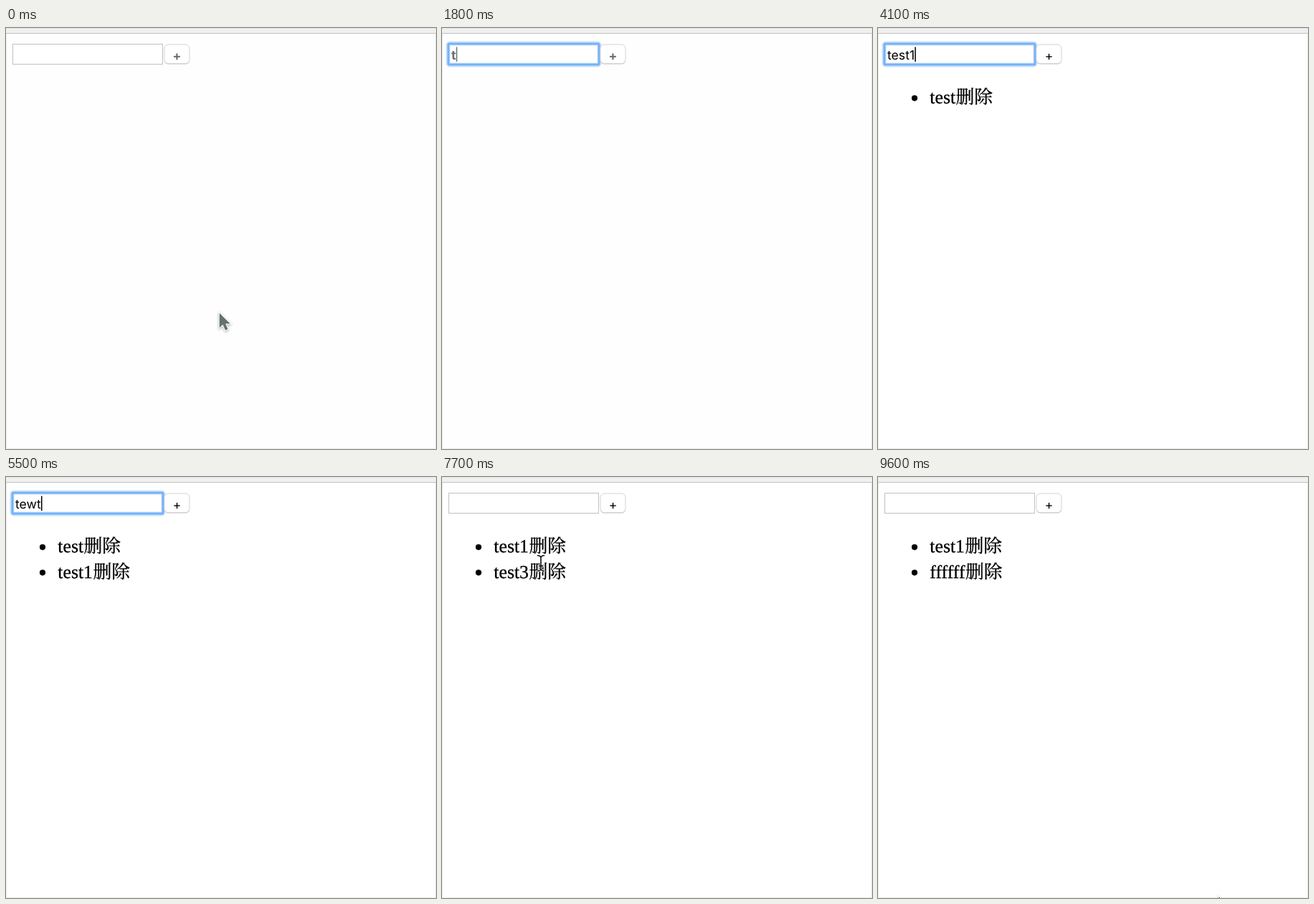
An HTML page that plays this animation: 600x587 px, repeating every 9700 ms.

```html
<!DOCTYPE html>
<html lang="zh">
<head>
<meta charset="utf-8">
<title>List demo</title>
<style>
  html, body { margin: 0; width: 100%; height: 100%; overflow: hidden; background: #fff; }
  svg { display: block; width: 600px; height: 587px; --ink: #000; }
  svg.faded { --ink: #667170; }
  text { fill: var(--ink); white-space: pre; text-rendering: geometricPrecision; }
  .ui { font: 17.6px Inter, "Liberation Sans", sans-serif; }
  .faded .ui { font-weight: 700; }
  .item {
    font: 25.8px "Liberation Serif", "Noto Serif CJK SC", "Noto Sans CJK SC", serif;
    font-variant-ligatures: none;
    stroke: var(--ink);
    stroke-width: .3px;
  }
  .cjk { font-family: "Noto Serif CJK SC", "Noto Sans CJK SC", "Noto Sans CJK", serif; font-weight: 500; }
  #arrow { filter: drop-shadow(0 1.5px 1.5px rgba(0, 0, 0, .35)); }
</style>
</head>
<body>
<svg id="stage" viewBox="0 0 600 587">
  <rect id="page" width="600" height="587" fill="#fff"/>
  <path d="M.5 8V586.5H599.5V8" fill="none" stroke="#ececec"/>
  <rect width="600" height="7" fill="#f0f0f0"/>
  <path d="M0 .5H600" stroke="#e3e3e3"/>
  <path d="M0 7.5H600" stroke="#c2c2c2"/>

  <rect x="9.5" y="22.5" width="209" height="28" fill="#fff" stroke="#c0c0c0"/>
  <g id="glow" fill="none">
    <rect x="8.5" y="21.5" width="211" height="30" rx="2.5" stroke="#a9d0fb" stroke-opacity=".6" stroke-width="6"/>
    <rect x="8.9" y="21.9" width="210.2" height="29.2" rx="1.5" stroke="#75b1f7" stroke-width="3"/>
  </g>
  <text id="typed" class="ui" x="13" y="43.5"></text>
  <rect id="caret" y="26.5" width="1.5" height="20.5" fill="var(--ink)"/>

  <rect x="221" y="24" width="35" height="26.6" rx="5.5" fill="#c4c4c4"/>
  <rect x="221" y="23" width="35" height="26.6" rx="5.5" fill="#fff" stroke="#d2d2d2"/>
  <text class="ui" x="238.5" y="44.8" text-anchor="middle">+</text>

  <g id="list"></g>

  <path id="arrow" d="M.8 1.4V21.9L5.6 17.6 9.1 25.4 12.6 23.8 9.2 16.3H15.8Z"
        fill="var(--ink)" stroke="#fff" stroke-width="2.4" paint-order="stroke"/>
  <g id="beam" fill="none" stroke-linecap="round"></g>
</svg>
<script>
const LOOP = 9700, STEP = 100, INK_AT = 3000;
const $ = id => document.getElementById(id);
const SVG = 'http://www.w3.org/2000/svg';

// [time, shape, x, y]; the pointer glides while two neighbours share a shape
const POINTER = [
  [0, 'arrow', 297, 396], [100, 'arrow', 236, 214],
  [200, 'beam', 162, 49], [300, 'beam', 162, 49],
  [400, 'arrow', 150, 100], [600, 'arrow', 118, 66],
  [700, 'beam', 122, 42], [900, 'beam', 120, 38],
  [1200, 'beam', 80, 38], [1500, 'beam', 76, 38], [1700, 'none'],
  [2500, 'beam', 90, 38], [2700, 'beam', 200, 38],
  [2800, 'arrow', 236, 38], [3100, 'arrow', 237, 39],
  [3200, 'beam', 160, 38], [3400, 'beam', 92, 38], [3500, 'none'],
  [4300, 'beam', 140, 38], [4400, 'arrow', 232, 38], [4600, 'arrow', 236, 39],
  [4700, 'beam', 150, 38], [4800, 'beam', 94, 38], [5100, 'none'],
  [6200, 'beam', 110, 38], [6300, 'beam', 190, 38],
  [6400, 'arrow', 234, 40], [6600, 'arrow', 238, 42], [6800, 'arrow', 238, 42],
  [7000, 'arrow', 196, 72], [7100, 'beam', 150, 94], [7300, 'beam', 136, 98],
  [7500, 'beam', 137, 104], [7700, 'beam', 138, 120], [7800, 'beam', 138, 126],
  [7900, 'arrow', 130, 70], [8000, 'beam', 112, 38], [8100, 'beam', 104, 38], [8200, 'none'],
  [8500, 'beam', 190, 38], [8600, 'arrow', 232, 39], [8800, 'arrow', 236, 42],
  [9000, 'arrow', 262, 84], [9300, 'arrow', 378, 330], [9600, 'arrow', 475, 584]
];

const TYPED = [
  [0, ''], [1800, 't'], [1900, 'te'], [2000, 'tes'], [2200, 'test'], [3000, ''],
  [3500, 't'], [3600, 'te'], [3700, 'tes'], [3900, 'test'], [4100, 'test1'], [4500, ''],
  [5200, 't'], [5300, 'te'], [5400, 'tew'], [5500, 'tewt'], [5600, 'tew'], [5700, 'te'],
  [5800, 'tes'], [5900, 'test'], [6000, 'test3'], [6500, ''],
  [8200, 'ff'], [8300, 'ffff'], [8400, 'ffffff'], [8700, '']
];

const FOCUS = [
  [0, false], [1200, true], [2900, false], [3400, true], [4500, false],
  [4800, true], [6400, false], [8100, true], [8600, false]
];

const LISTS = [
  [0, []], [3000, ['test']], [4500, ['test', 'test1']],
  [6500, ['test', 'test1', 'test3']], [7400, ['test1', 'test3']],
  [7800, ['test1']], [8700, ['test1', 'ffffff']]
];

const indexAt = (table, t) => table.findLastIndex(row => row[0] <= t);
const valueAt = (table, t) => table[indexAt(table, t)][1];

function make(tag, attrs, parent, content = '') {
  const el = document.createElementNS(SVG, tag);
  for (const key in attrs) el.setAttribute(key, attrs[key]);
  el.textContent = content;
  return parent.appendChild(el);
}

function drawList(items) {
  $('list').replaceChildren();
  items.forEach((name, i) => {
    const y = 105.3 + i * 35.5;
    make('circle', { cx: 51, cy: y - 7.5, r: 4.1, fill: 'var(--ink)' }, $('list'));
    const line = make('text', { class: 'item', x: 72.3, y }, $('list'), name);
    make('tspan', { class: 'cjk', dx: .4 }, line, '删除');
  });
}

function drawPointer(t) {
  const i = indexAt(POINTER, t);
  const [start, shape, x, y] = POINTER[i];
  const next = POINTER[i + 1];
  const k = next && next[1] === shape ? (t - start) / (next[0] - start) : 0;
  for (const id of ['arrow', 'beam']) $(id).style.display = id === shape ? '' : 'none';
  if (shape === 'none') return;
  const px = k ? x + (next[2] - x) * k : x;
  const py = k ? y + (next[3] - y) * k : y;
  $(shape).setAttribute('transform', `translate(${px} ${py})`);
}

function draw(t) {
  const faded = t < INK_AT;
  $('stage').classList.toggle('faded', faded);
  $('page').setAttribute('fill', faded ? '#fefefe' : '#fff');

  const focused = valueAt(FOCUS, t);
  $('glow').style.display = $('caret').style.display = focused ? '' : 'none';
  $('typed').textContent = valueAt(TYPED, t);
  $('caret').setAttribute('x', 13.3 + $('typed').getComputedTextLength());

  drawList(valueAt(LISTS, t));
  drawPointer(t);
}

// The beam is a white halo with a thin dark line on top.
const BEAM = 'M-4.5 -10.5Q-.5 -10.5 0 -7.5Q.5 -10.5 4.5 -10.5M0 -7.5V8M-4.5 11Q-.5 11 0 8Q.5 11 4.5 11M-2.5 4H2.5';
make('path', { d: BEAM, stroke: '#fff', 'stroke-width': 3.2 }, $('beam'));
make('path', { d: BEAM, stroke: 'var(--ink)', 'stroke-width': 1.5 }, $('beam'));

const began = performance.now();
let last = -1;
function tick() {
  const elapsed = Math.max(0, performance.now() - began) % LOOP;
  const t = Math.floor(elapsed / STEP) * STEP;
  if (t !== last) draw(last = t);
  requestAnimationFrame(tick);
}
tick();
</script>
</body>
</html>
```
